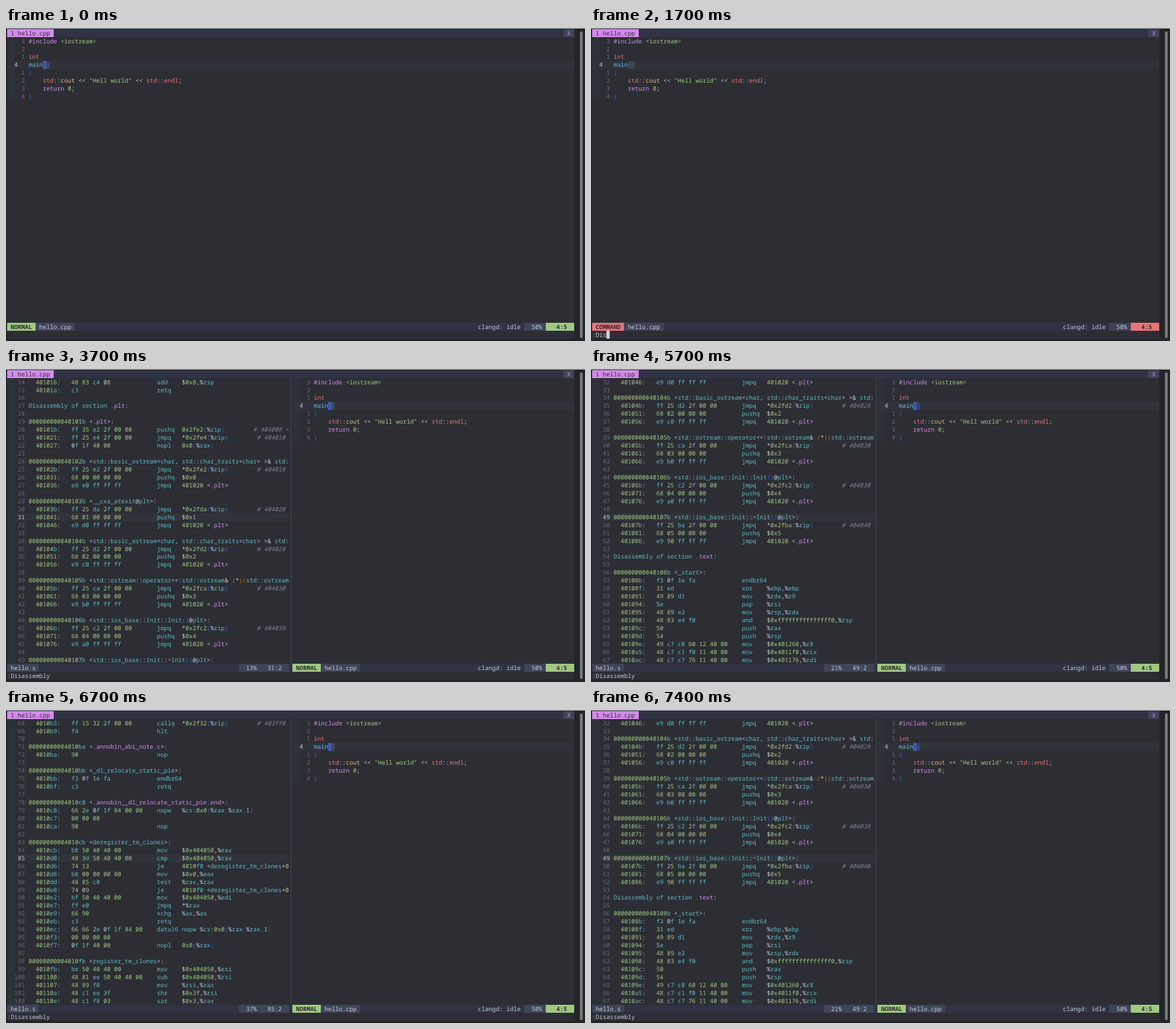
Animation, 1019 px wide and 550 px high, one loop 7.9 s. Source, as an HTML page with a canvas:

```html
<!DOCTYPE html>
<html lang="en">
<head>
<meta charset="utf-8">
<title>Disassembly in the editor</title>
<style>
html, body { margin: 0; width: 100%; height: 100%; overflow: hidden; background: #232529; }
canvas { display: block; }
</style>
</head>
<body>
<canvas id="stage" width="1019" height="550"></canvas>
<script>
const ctx = document.getElementById('stage').getContext('2d');
const LOOP = 7900, OPEN_AT = 3700;
const COLS = 159, ROWS = 39, LEFT_COLS = 79, GUTTER = 6;
const ORIGIN = 2, CELL_W = 998 / COLS, CELL_H = 13.95;
const C = {
  outside: '#232529', bg: '#2c2e34', sign: '#2d3138', line: '#30333a', bar: '#2f3343',
  segment: '#404459', match: '#3b4152', fg: '#c5cdd9', dim: '#646a76', comment: '#7e8294',
  red: '#ec7279', yellow: '#deb974', green: '#a0c980', cyan: '#5dbbc1', blue: '#6cb6eb',
  purple: '#d38aea', paren: '#3a5fcd', paren2: '#cd6600'
};

const hex = n => n.toString(16);

// One lazy-binding stub of the .plt section.
function stub(n, name) {
  const offset = 0x2fe2 - 8 * n;
  return `<${name}
ff 25 ${hex(offset & 255)} 2f 00 00|jmpq|*0x${hex(offset)}(%rip)        # ${hex(0x404018 + 8 * n)}
68 0${n} 00 00 00|pushq|$0x${n}
e9 ${hex(0xe0 - 16 * n)} ff ff ff|jmpq|401020 <.plt>
`;
}

const OSTREAM = 'std::basic_ostream<char, std::char_traits<char> >& std::';
const STUBS = [OSTREAM, '__cxa_atexit@plt>:', OSTREAM,
  'std::ostream::operator<<(std::ostream& (*)(std::ostream',
  'std::ios_base::Init::Init()@plt>:', 'std::ios_base::Init::~Init()@plt>:'];

// Instructions are "bytes|mnemonic|operands"; addresses follow from the byte counts.
const SOURCE = `48 83 c4 08|add|$0x8,%rsp
c3|retq

Disassembly of section .plt:

<.plt>:
ff 35 e2 2f 00 00|pushq|0x2fe2(%rip)        # 404008 <
ff 25 e4 2f 00 00|jmpq|*0x2fe4(%rip)        # 404010
0f 1f 40 00|nopl|0x0(%rax)

${STUBS.map((name, n) => stub(n, name)).join('\n')}
Disassembly of section .text:

<_start>:
f3 0f 1e fa|endbr64
31 ed|xor|%ebp,%ebp
49 89 d1|mov|%rdx,%r9
5e|pop|%rsi
48 89 e2|mov|%rsp,%rdx
48 83 e4 f0|and|$0xfffffffffffffff0,%rsp
50|push|%rax
54|push|%rsp
49 c7 c0 60 12 40 00|mov|$0x401260,%r8
48 c7 c1 f0 11 40 00|mov|$0x4011f0,%rcx
48 c7 c7 76 11 40 00|mov|$0x401176,%rdi
ff 15 32 2f 00 00|callq|*0x2f32(%rip)        # 403ff0
f4|hlt

<.annobin_abi_note.c>:
90|nop

<_dl_relocate_static_pie>:
f3 0f 1e fa|endbr64
c3|retq

<.annobin__dl_relocate_static_pie.end>:
66 2e 0f 1f 84 00 00|nopw|%cs:0x0(%rax,%rax,1)
00 00 00|
90|nop

<deregister_tm_clones>:
b8 50 40 40 00|mov|$0x404050,%eax
48 3d 50 40 40 00|cmp|$0x404050,%rax
74 13|je|4010f0 <deregister_tm_clones+0
b8 00 00 00 00|mov|$0x0,%eax
48 85 c0|test|%rax,%rax
74 09|je|4010f0 <deregister_tm_clones+0
bf 50 40 40 00|mov|$0x404050,%edi
ff e0|jmpq|*%rax
66 90|xchg|%ax,%ax
c3|retq
66 66 2e 0f 1f 84 00|data16|nopw %cs:0x0(%rax,%rax,1)
00 00 00 00|
0f 1f 40 00|nopl|0x0(%rax)

<register_tm_clones>:
be 50 40 40 00|mov|$0x404050,%esi
48 81 ee 50 40 40 00|sub|$0x404050,%rsi
48 89 f0|mov|%rsi,%rax
48 c1 ee 3f|shr|$0x3f,%rsi
48 c1 f8 03|sar|$0x3,%rax`;

const FIRST_LINE = 14, TOTAL_LINES = 229;
let address = 0x401016;
const listing = SOURCE.split('\n').map(line => {
  let text = line;
  if (line.startsWith('<')) {
    text = hex(address).padStart(16, '0') + ' ' + line;
  } else if (line.includes('|')) {
    const [bytes, mnemonic, operands = ''] = line.split('|');
    text = `  ${hex(address)}:   ${bytes.padEnd(24)}${mnemonic.padEnd(7)}${operands}`;
    address += bytes.split(' ').length;
  }
  return highlight(text.slice(0, LEFT_COLS - GUTTER));
});

// Splits an assembly line into [column, text, colour] tokens.
function highlight(text) {
  const pattern = /(#.*)|(\.[a-z][\w-]*)|([a-z_]\w*)|(0x[\da-f]+|0[0-7]{2,}|0+[1-7]?(?=[\s,;]|$)|[1-9]\d*)|(\S)/gi;
  let depth = 0;
  return [...text.matchAll(pattern)].map(m => {
    const kind = m.slice(1).findIndex(group => group !== undefined);
    let color = [C.comment, C.purple, C.cyan, C.green, C.fg][kind];
    if (kind === 4) {
      if (m[0] === '(') depth++;
      if ('()'.includes(m[0]) || (m[0] === ',' && depth)) color = depth > 1 ? C.paren2 : C.paren;
      if (m[0] === ')') depth--;
    }
    return [m.index, m[0], color];
  });
}

const program = [
  [['#include', C.purple], [' <iostream>', C.green]],
  [],
  [['int', C.red]],
  [['main', C.blue]],
  [['{', C.paren]],
  [['    std', C.red], ['::', C.fg], ['cout', C.yellow], [' << ', C.fg], ['"Hell world"', C.green],
    [' << ', C.fg], ['std', C.red], ['::', C.fg], ['endl', C.red], [';', C.fg]],
  [['    return', C.purple], [' 0', C.green], [';', C.fg]],
  [['}', C.paren]]
];
const CURRENT = 3;

// [start time, value] steps
const commands = [[0, ''], [400, ':'], [800, ':d'], [1200, ':'], [1500, ':D'], [1700, ':Dis'], [2000, ':Disassembly']];
const cursorLines = [[OPEN_AT, 31], [5700, 49], [6100, 67], [6700, 85], [7000, 67], [7400, 49]];
const at = (steps, t) => steps.filter(([start]) => start <= t).pop()[1];

const colX = col => ORIGIN + col * CELL_W;
const rowY = row => ORIGIN + row * CELL_H;

function box(col, row, cols, rows, color) {
  const x = Math.round(colX(col)), y = Math.round(rowY(row));
  ctx.fillStyle = color;
  ctx.fillRect(x, y, Math.round(colX(col + cols)) - x, Math.round(rowY(row + rows)) - y);
}

function write(col, row, text, color, style = '') {
  ctx.font = `${style} ${CELL_W / 0.6}px "Noto Sans Mono", "DejaVu Sans Mono", monospace`;
  ctx.fillStyle = color;
  ctx.fillText(text, colX(col), rowY(row) + 10.6);
}

function label(col, row, text, color, background, style) {
  box(col, row, text.length, 1, background);
  write(col + text.search(/\S/), row, text.trim(), color, style);
}

function drawProgram(left, mode) {
  const normal = mode === 'NORMAL';
  const accent = normal ? C.green : C.red;
  box(left, 1, 2, program.length, C.sign);
  box(left, CURRENT + 1, COLS - left, 1, C.line);
  program.forEach((tokens, i) => {
    const row = i + 1;
    if (i === CURRENT) write(left + 2, row, '4', C.fg);
    else write(left + 4, row, String(Math.abs(i - CURRENT)), C.dim);
    let col = left + GUTTER;
    for (const [text, color] of tokens) {
      write(col, row, text, color);
      col += text.length;
    }
  });
  const parens = left + GUTTER + 4;
  label(parens, CURRENT + 1, '(', normal ? C.match : C.paren, normal ? C.paren : C.match);
  label(parens + 1, CURRENT + 1, ')', C.paren, C.match);

  const bar = ROWS - 2;
  label(left, bar, ` ${mode} `, C.bg, accent, 'bold');
  label(left + mode.length + 2, bar, ' hello.cpp ', C.fg, C.segment);
  write(132, bar, 'clangd: idle', C.fg);
  label(145, bar, '  50% ', C.fg, C.segment);
  label(151, bar, '   4:5  ', C.bg, accent, 'bold');
}

function drawListing(cursorLine) {
  const rows = ROWS - 3, top = cursorLine - 17, bar = ROWS - 2;
  box(0, 1, 2, rows, C.sign);
  box(2, 18, LEFT_COLS - 2, 1, C.line);
  for (let i = 0; i < rows; i++) {
    const number = top + i;
    write(2, i + 1, String(number).padStart(3), number === cursorLine ? C.fg : C.dim);
    for (const [col, text, color] of listing[number - FIRST_LINE])
      write(GUTTER + col, i + 1, text, color, color === C.comment ? 'italic' : '');
  }
  ctx.fillStyle = '#464a55';
  ctx.fillRect(501, Math.round(rowY(1)), 1, Math.round(rowY(bar)) - Math.round(rowY(1)));
  label(0, bar, ' hello.s ', C.fg, C.segment);
  const percent = Math.floor(100 * cursorLine / TOTAL_LINES);
  label(65, bar, `  ${percent}%   ${cursorLine}:2  `, C.fg, C.segment);
}

function draw(t) {
  ctx.fillStyle = C.outside;
  ctx.fillRect(0, 0, 1019, 550);
  ctx.fillStyle = '#c4c5c7';
  ctx.fillRect(0, 0, 1019, 1);
  ctx.fillStyle = '#77787b';
  ctx.beginPath();
  ctx.roundRect(1010, 6, 5, 539, 2.5);
  ctx.fill();

  box(0, 0, COLS, ROWS, C.bg);
  box(0, 0, COLS, 1, C.bar);
  box(0, ROWS - 2, COLS, 1, C.bar);
  label(0, 0, ' 1 hello.cpp ', C.bg, C.purple);
  label(156, 0, ' X ', C.purple, C.segment);

  const open = t >= OPEN_AT;
  const mode = t < 400 || open ? 'NORMAL' : 'COMMAND';
  if (open) drawListing(at(cursorLines, t));
  drawProgram(open ? LEFT_COLS + 1 : 0, mode);

  const command = at(commands, t);
  write(0, ROWS - 1, command, C.fg);
  if (t >= 400 && t < 2600) box(command.length, ROWS - 1, 1, 1, C.fg);
}

ctx.textRendering = 'geometricPrecision';
const started = performance.now();
function tick() {
  draw((performance.now() - started) % LOOP);
  requestAnimationFrame(tick);
}
tick();
</script>
</body>
</html>
```
